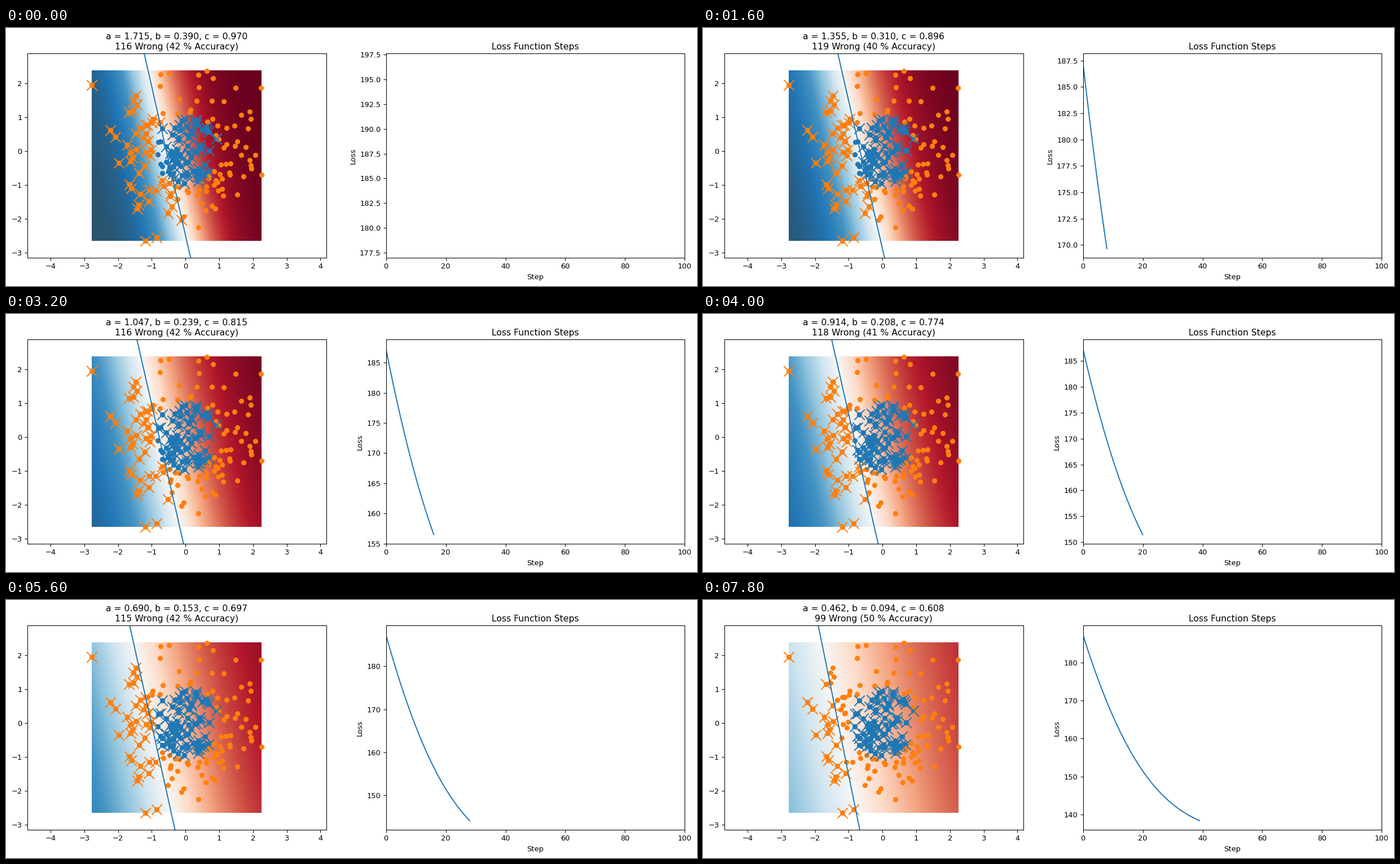
Animation, 1225 px wide and 457 px high, one loop 8 s. Source, as a matplotlib script:

```python
import numpy as np
import matplotlib.pyplot as plt
from matplotlib.animation import FuncAnimation
from matplotlib.colors import LinearSegmentedColormap

W, H, DPI = 1225, 457, 94
STEPS, INTERVAL = 40, 200
RATE = 0.001
COLORS = ("C0", "C1")
SHADES = ("#2b5068", "#2074b3", "#4393c3", "#92c5de", "#d1e5f0", "#f7f7f7",
          "#fddbc7", "#f4a582", "#d6604d", "#b2182b", "#67001f")

# Panel geometry in pixels: two equal panels on one row
LEFT, BOTTOM = 37.8, 407.3
PANEL_W, PANEL_H = 529.82, 361.9
PITCH = 1.2 * PANEL_W


def sigmoid(z):
    return 1 / (1 + np.exp(-z))


def add_panel(column):
    return fig.add_axes([(LEFT + column * PITCH) / W, 1 - BOTTOM / H,
                         PANEL_W / W, PANEL_H / H])


# Data: points inside the unit circle against points outside it
rng = np.random.RandomState(0)
weights = rng.randn(3)
points = rng.randn(200, 2)
label = (points ** 2).sum(axis=1) > 1
design = np.column_stack([points, np.ones(len(points))])

# Logistic regression by gradient descent
history, losses = [], []
for _ in range(STEPS):
    weights = weights - RATE * design.T @ (sigmoid(design @ weights) - label)
    z = design @ weights
    history.append(weights)
    losses.append(np.sum(np.log1p(np.exp(z)) - label * z))

plt.rcParams["font.family"] = "DejaVu Sans"
fig = plt.figure(figsize=(W / DPI, H / DPI), dpi=DPI, facecolor="white")

# Left: classifier
ax = add_panel(0)
(x0, y0), (x1, y1) = points.min(axis=0), points.max(axis=0)
pad = 0.1 * (y1 - y0)
low, high = y0 - pad, y1 + pad
half = (high - low) * PANEL_W / PANEL_H / 2
mid = (x0 + x1) / 2
grid_x, grid_y = np.meshgrid(np.linspace(x0, x1, 302), np.linspace(y0, y1, 302))
field = ax.imshow(np.zeros_like(grid_x), extent=(x0, x1, y0, y1), origin="lower",
                  cmap=LinearSegmentedColormap.from_list("field", SHADES),
                  vmin=0, vmax=1, aspect="auto")
for kind, color in enumerate(COLORS):
    ax.scatter(*points[label == kind].T, color=color)
crosses = [ax.scatter([], [], marker="x", s=200, color=c) for c in COLORS]
border, = ax.plot([], [], color="C0")
ax.set_xlim(mid - half, mid + half)
ax.set_ylim(low, high)
title = ax.set_title("")

# Right: loss curve
loss_ax = add_panel(1)
curve, = loss_ax.plot([], [], color="C0")
loss_ax.set_xlim(0, 100)
loss_ax.set_title("Loss Function Steps")
loss_ax.set_xlabel("Step")
loss_ax.set_ylabel("Loss")


def draw(step):
    a, b, c = history[step]
    field.set_data(sigmoid(a * grid_x + b * grid_y + c))

    wrong = (design @ history[step] > 0) != label
    for kind, cross in enumerate(crosses):
        cross.set_offsets(points[wrong & (label == kind)])

    ys = np.array([low - 1, high + 1])
    border.set_data(-(b * ys + c) / a, ys)

    count = wrong.sum()
    accuracy = 100 * (len(points) - count) // len(points)
    title.set_text(f"a = {a:.3f}, b = {b:.3f}, c = {c:.3f}\n"
                   f"{count} Wrong ({accuracy} % Accuracy)")

    curve.set_data(np.arange(step + 1), losses[:step + 1])
    loss_ax.relim()
    loss_ax.autoscale_view(scalex=False)


anim = FuncAnimation(fig, draw, frames=STEPS, interval=INTERVAL,
                     init_func=lambda: draw(0), repeat=True, repeat_delay=0)
plt.show()
```
